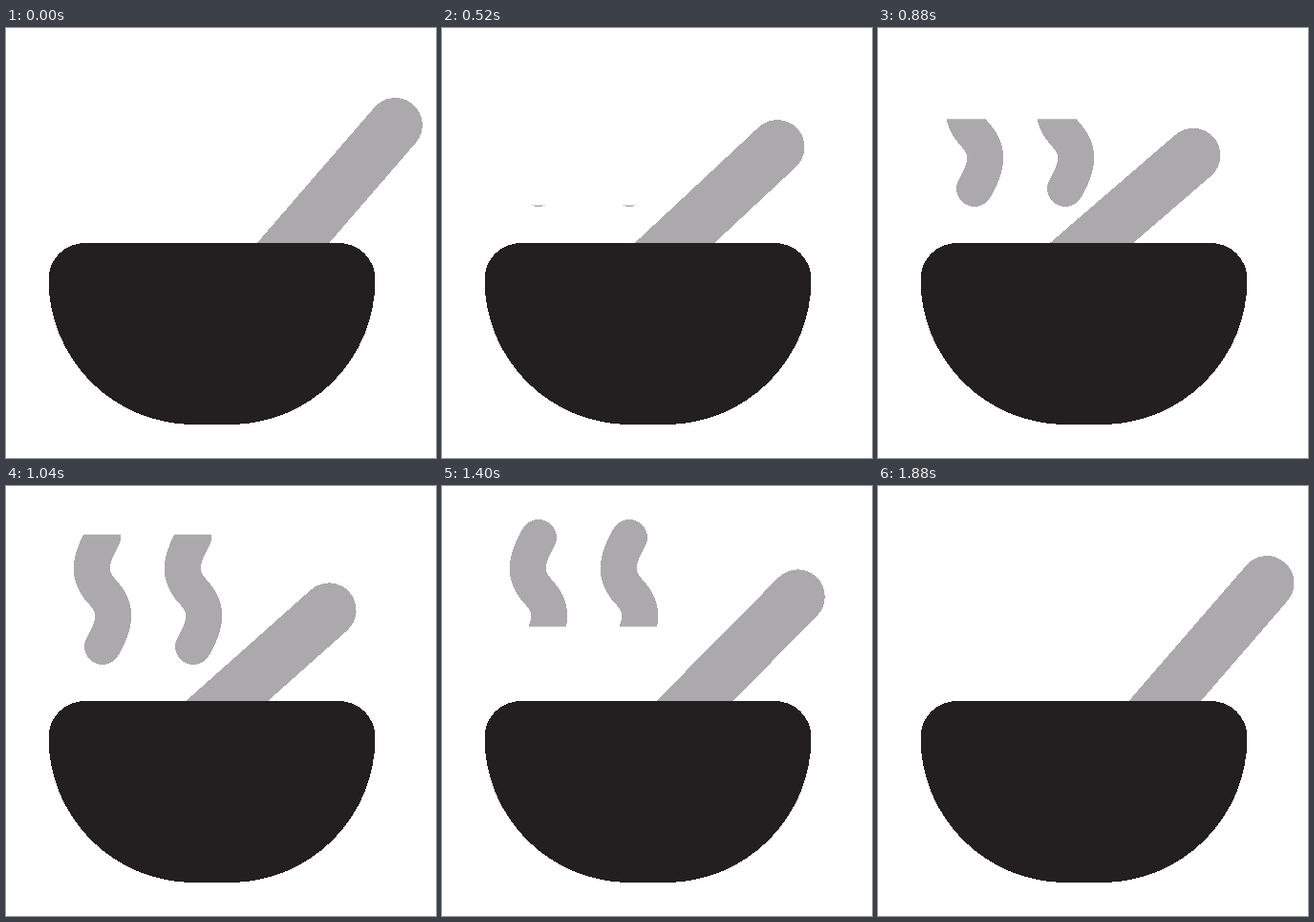
Animation, 450 px wide and 450 px high, one loop 1.92 s. Source, as an HTML page:

```html
<!DOCTYPE html>
<html lang="en">
<head>
<meta charset="utf-8">
<title>Steaming bowl</title>
<style>
  html, body { margin: 0; width: 100%; height: 100%; overflow: hidden; background: #fff; }
  svg { display: block; width: 100vw; height: 100vh; shape-rendering: crispEdges; }
  .stroke { fill: none; stroke: #aba9ac; stroke-linecap: round; }
</style>
</head>
<body>
<svg viewBox="0 0 450 450">
  <defs>
    <clipPath id="wipe"><rect id="window" x="0" width="450"/></clipPath>
    <path id="wisp" d="M101 54C86 80 86 95 101 111S116 142 101 168"/>
  </defs>
  <g class="stroke" stroke-width="38" clip-path="url(#wipe)">
    <use href="#wisp"/>
    <use href="#wisp" x="95"/>
  </g>
  <path id="spoon" class="stroke" stroke-width="57" d="M0 0H-250"/>
  <path fill="#231f20" d="M82.5 225H348.5A38 38 0 0 1 386.5 263A152 152 0 0 1 234.5 415H196.5A152 152 0 0 1 44.5 263A38 38 0 0 1 82.5 225Z"/>
</svg>
<script>
  const LOOP = 1920, STEP = 40;
  const spoon = document.getElementById('spoon');
  const wipe = document.getElementById('window');

  const mix = (a, b, k) => a + (b - a) * k;

  // Eased progress from 0 to 1 between two times
  function ease(t, from, to) {
    const u = Math.min(1, Math.max(0, (t - from) / (to - from)));
    return u * u * (3 - 2 * u);
  }

  function draw(t) {
    const k = ease(t, 0, 800) - ease(t, 800, LOOP);
    const x = mix(407.3, 328.8, k);
    const y = mix(101.5, 133.7, k);
    const angle = mix(-49.15, -40.65, k);
    spoon.setAttribute('transform', `translate(${x} ${y}) rotate(${angle})`);

    // Steam is uncovered upwards, then erased upwards
    const top = mix(190, 25, ease(t, 440, 1240));
    const bottom = mix(190, 25, ease(t, 1240, 1720));
    wipe.setAttribute('y', top);
    wipe.setAttribute('height', Math.max(0, bottom - top));
  }

  const start = performance.now();
  function tick() {
    const t = (performance.now() - start) % LOOP;
    draw(Math.floor(t / STEP) * STEP);
    requestAnimationFrame(tick);
  }
  tick();
</script>
</body>
</html>
```
